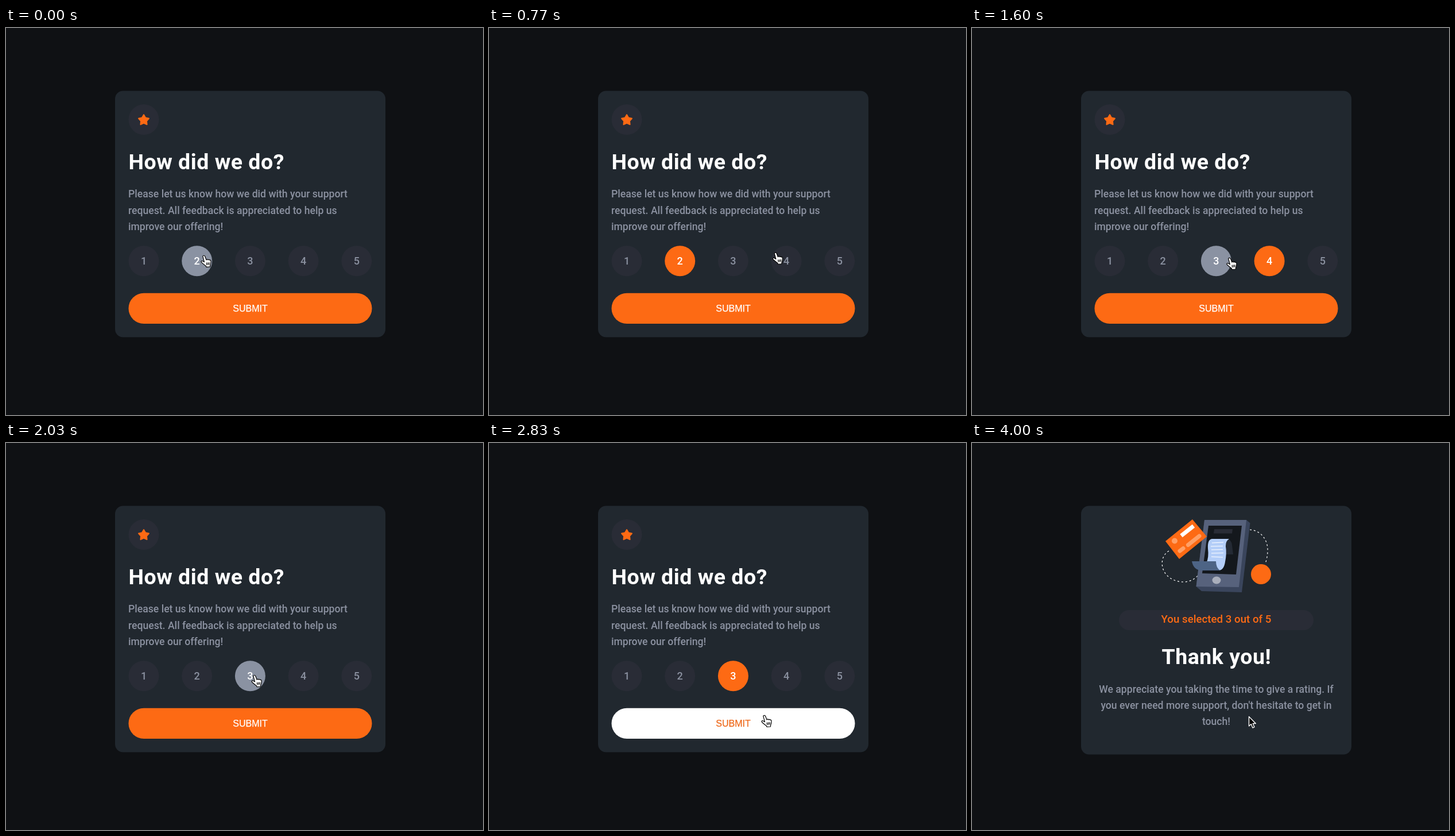
These frames come from a looping animation (831 by 674 pixels, 4.03 s). An HTML page:

```html
<!DOCTYPE html>
<html lang="en">
<head>
<meta charset="utf-8">
<title>Rating card</title>
<style>
  html, body { margin: 0; width: 100%; height: 100%; overflow: hidden; background: #0f1114; }
  svg { display: block; width: 100%; height: 100%; }
  text { font-family: Roboto, "Open Sans", sans-serif; }
  .card { fill: #21282f; }
  .dim { fill: #292c36; }
  .accent { fill: #fd6a14; }
  .title { font-size: 37.5px; font-weight: 700; letter-spacing: .5px; fill: #fff; }
  .body { font-size: 17.6px; font-weight: 500; fill: #8b91a0; }
  .digit { font-size: 18px; font-weight: 500; }
  .middle { text-anchor: middle; }
  .submit { font: 16px "Liberation Sans", Arial, sans-serif; stroke-width: .25; }
  .line { fill: none; stroke: #fff; stroke-width: 1.2; }
  .dash { stroke-dasharray: 3 4; }
  .peach { fill: none; stroke: #ffa066; stroke-width: 7; stroke-linecap: round; }
</style>
</head>
<body>
<svg viewBox="0 0 831 674">
  <g id="form">
    <rect class="card" x="190" y="109.5" width="471" height="429" rx="14"/>
    <circle class="dim" cx="240" cy="159.5" r="26.5"/>
    <polygon id="star" fill="#fd6a14" stroke="#fd6a14" stroke-width="2" stroke-linejoin="round"/>
    <text class="title" x="213.5" y="245.5">How did we do?</text>
    <g class="body">
      <text x="213" y="295.3">Please let us know how we did with your support</text>
      <text x="213" y="323.6">request. All feedback is appreciated to help us</text>
      <text x="213" y="351.9">improve our offering!</text>
    </g>
    <g id="ratings"></g>
    <rect id="button" x="213.5" y="461.7" width="424" height="53.3" rx="26.6"/>
    <text id="submit" class="submit middle" x="425.5" y="493.7">SUBMIT</text>
  </g>

  <g id="thanks">
    <rect class="card" x="190" y="109.5" width="471" height="433" rx="14"/>
    <path class="line dash" d="M343 188C326 198 328 224 345 235C362 246 384 244 395 229"/>
    <path class="line dash" d="M484 151C504 152 516 170 515 188C515 196 513 204 511 210"/>
    <path fill="#3a455c" d="M405 134H478L484.5 139.500L470 260L400 258L390.500 250Z"/>
    <path fill="#57627c" d="M405 134H478L465 251L390.500 250Z"/>
    <path fill="#14181d" d="M412 144H470L460 229L401 227Z"/>
    <path class="dim" d="M422 150H454L453 157.500H421Z"/>
    <path fill="#242a34" d="M444 167Q452 168 453 178L455 194H441Z"/>
    <path fill="#b4cef8" d="M418 167H448Q442 170 442 180Q444 192 441 207Q439 221 430 222L408 210Q413 199 411 184Q410 168 418 167Z"/>
    <path fill="#4d6485" d="M383 206H425Q425 217 432 222H401Q386 222 383 206Z"/>
    <path class="line" d="M418 174L438 173M416 180L437 179.500M417 186L437 185.500M417 192L438 191.500M417 198L437 199"/>
    <ellipse fill="#a9aebb" cx="426" cy="239" rx="7.500" ry="6.500"/>
    <path class="accent" d="M337 171L384 133L409 163L361 202Z"/>
    <path fill="none" stroke="#fff" stroke-width="7" d="M364.500 161.500L386 144.500"/>
    <circle fill="#ffa066" cx="353" cy="170.500" r="5"/>
    <path class="peach" d="M376.500 177.500L396 162M362 188L368 183.500"/>
    <circle class="accent" cx="503.500" cy="228.500" r="17.500"/>
    <rect class="dim" x="256" y="291" width="339" height="35" rx="17.500"/>
    <text class="accent middle" x="425.500" y="313.200" font-size="18.7" font-weight="500">You selected 3 out of 5</text>
    <text class="title middle" x="425.800" y="385" font-size="38">Thank you!</text>
    <g class="body middle">
      <text x="425.500" y="434.800">We appreciate you taking the time to give a rating. If</text>
      <text x="425.500" y="463.100">you ever need more support, don't hesitate to get in</text>
      <text x="425.500" y="491.400">touch!</text>
    </g>
  </g>

  <path id="arrow" fill="#000" stroke="#fff" stroke-width="1.4" stroke-linejoin="round"
    d="M.5.500V17L4.300 13.500L7 20L10 18.700L7.200 12.500H12.300Z"/>
  <g id="hand" stroke="#000" stroke-width="1.2" stroke-linejoin="round" stroke-linecap="round">
    <path fill="#fff" d="M-1.200 .6C-.8 -1.200 2 -1.200 2.600 .8L5 7C5.600 5.400 7.600 5.600 8 7C9 5.800 10.400 6.200 10.800 7.400C12 6.800 13 7.600 13 9.400C13 13 12.200 14.500 11.600 16.500L11.400 19L5 19.500L4.400 17.800C2 16 -1 13.500 -3.500 11.200C-5 9.400 -3 7.800 -1.400 9L1.400 10.600Z"/>
    <path fill="none" d="M5.300 12L5.600 15.500M7.600 11.800L7.800 15.300M9.900 11.600V15"/>
  </g>
</svg>
<script>
const LOOP = 4030, THANKS_AT = 3270, ARROW_AT = 3390;
const HOVER_LAG = 40;
const RADIUS = 26.5, ROW_Y = 405.7;
const DIM = "#292c36", ACCENT = "#fd6a14";
const $ = id => document.getElementById(id);

// Pointer path: time, x, y
const path = [
  [0, 344, 397], [60, 347, 395], [160, 365, 384], [290, 405, 371], [470, 449, 374],
  [530, 455, 375], [570, 458, 376], [760, 497, 391], [920, 518, 402], [1070, 520, 402],
  [1310, 520, 402], [1430, 492, 402], [1550, 450, 401], [1600, 448, 401], [1750, 434, 404],
  [2200, 431, 406], [2300, 433, 409], [2420, 445, 419], [2470, 454, 426], [2640, 470, 461],
  [2740, 476, 472], [2830, 479, 475], [3030, 482, 476], [LOOP, 482, 476]
];

const ratings = [1, 2, 3, 4, 5].map(value => {
  const x = 240 + (value - 1) * 92.7;
  const group = $("ratings");
  group.insertAdjacentHTML("beforeend",
    `<g><circle cx="${x}" cy="${ROW_Y}" r="${RADIUS}"/>` +
    `<text class="digit middle" x="${x}" y="412">${value}</text></g>`);
  const [circle, label] = group.lastChild.children;
  return { value, x, circle, label };
});

$("star").setAttribute("points", Array.from({ length: 10 }, (_, i) => {
  const r = i % 2 ? 5.2 : 9.4, a = i * Math.PI / 5;
  return [240 + r * Math.sin(a), 160.5 - r * Math.cos(a)];
}).join(" "));

function pointerAt(t) {
  const i = Math.max(1, path.findIndex(key => key[0] >= t));
  const [t0, x0, y0] = path[i - 1], [t1, x1, y1] = path[i];
  const k = (t - t0) / (t1 - t0);
  return [x0 + (x1 - x0) * k, y0 + (y1 - y0) * k];
}

function hit([x, y]) {
  if (y > 461.5) return "submit";
  const found = ratings.find(r => Math.hypot(x - r.x, y - ROW_Y) < RADIUS);
  return found ? found.value : null;
}

function show(id, on) {
  $(id).style.display = on ? "" : "none";
}

function draw(t) {
  const pointer = pointerAt(t);
  const hovered = hit(pointerAt(Math.max(0, t - HOVER_LAG)));
  const selected = t < 1060 ? 2 : t < 2000 ? 4 : 3;

  for (const { value, circle, label } of ratings) {
    const fill = value === hovered ? "#8a92a2" : value === selected ? ACCENT : DIM;
    circle.style.fill = fill;
    label.style.fill = fill === DIM ? "#8b91a0" : "#fff";
  }
  const onSubmit = hovered === "submit";
  $("button").style.fill = onSubmit ? "#fff" : ACCENT;
  $("submit").style.fill = $("submit").style.stroke = onSubmit ? "#ee6a1c" : "#fff";

  show("form", t < THANKS_AT);
  show("thanks", t >= THANKS_AT);
  const pointing = hit(pointer) !== null && t < ARROW_AT;
  show("hand", pointing);
  show("arrow", !pointing);
  $(pointing ? "hand" : "arrow").setAttribute("transform", `translate(${pointer})`);
}

const start = performance.now();
function frame() {
  draw((performance.now() - start) % LOOP);
  requestAnimationFrame(frame);
}
frame();
</script>
</body>
</html>
```
